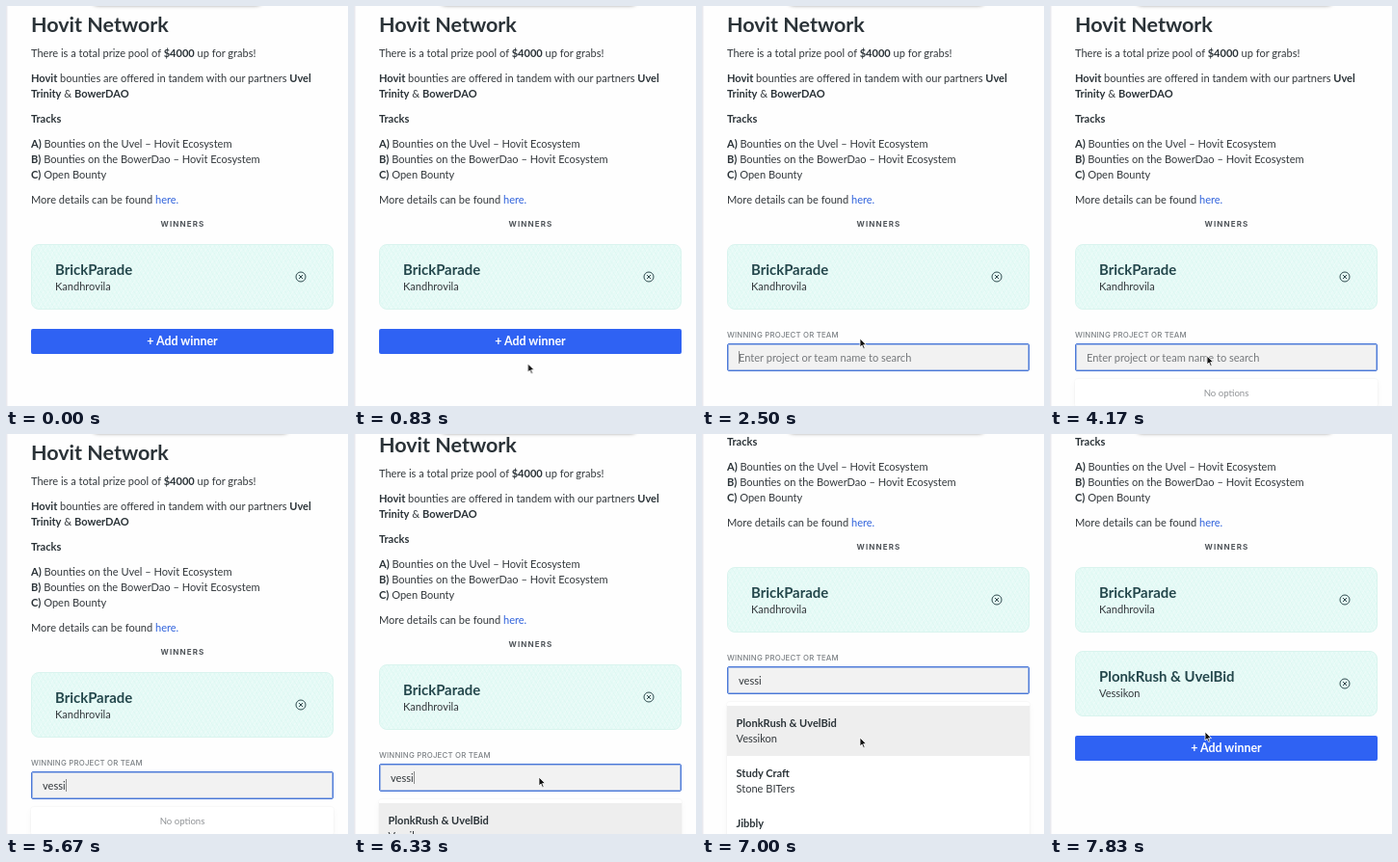
An HTML page for the animation above (8000 ms loop, 355 px wide and 415 px high).

```html
<!DOCTYPE html>
<html lang="en">
<head>
<meta charset="utf-8">
<title>Add a winner</title>
<style>
  html, body { margin: 0; width: 100%; height: 100%; overflow: hidden; background: #fff; }
  body { font: 11.05px/16px Lato, sans-serif; color: #33383c; }
  b, h1, h2 { font-weight: 700; color: #2b3338; }

  /* One loop is 48 frames; every keyframe falls on a multiple of 1/48. */
  .fx, .typed::before { animation: 8s step-end -5ms infinite; }

  .stage { position: relative; width: 355px; height: 415px; overflow: hidden; background: #fefefe; }
  .edge { position: absolute; left: 0; top: 0; width: 1px; height: 100%; background: #e9e9ee; border-right: 1px solid #f4f4f7; }
  .bar {
    position: absolute; left: 90px; top: -12px; width: 203px; height: 11px; border-radius: 6px;
    background: #fff; box-shadow: 0 0 4px rgba(0, 0, 0, .55); animation-name: bar;
  }
  .page { position: absolute; inset: 0; animation-name: scroll; }

  .line { position: absolute; left: 26px; top: calc(var(--y) * 1px - 8px); margin: 0; white-space: nowrap; }
  h1.line { font-size: 21.5px; }
  .link { color: #2f62dc; }
  .caps { font: 500 7.8px/16px Inter, sans-serif; letter-spacing: .2px; color: #7c8185; }
  .heading { left: 26px; width: 315px; text-align: center; font-weight: 700; font-size: 8px; letter-spacing: 1.1px; color: #4f5459; }

  .card {
    position: absolute; left: 26px; top: calc(var(--y) * 1px); width: 314px; height: 68px;
    box-sizing: border-box; border: 1px solid #d9f4ee; border-radius: 8px; background-color: #e5faf6;
    background-image:
      repeating-linear-gradient(60deg, rgba(200, 240, 231, .2) 0 1px, transparent 1px 4px),
      repeating-linear-gradient(-60deg, rgba(255, 255, 255, .25) 0 1px, transparent 1px 4px);
  }
  .card h2, .card p { position: absolute; left: 24px; margin: 0; white-space: nowrap; }
  .card h2 { top: 16px; font-size: 14.9px; line-height: 18px; color: #24474c; }
  .card p { top: 35px; }
  .card svg { position: absolute; left: 273px; top: 27px; fill: none; stroke: #2f4a4e; }

  .button {
    position: absolute; left: 26px; top: calc(var(--y) * 1px); width: 314px; height: 26px; border-radius: 2px;
    background: #2f62f3; color: #fff; font-weight: 700; font-size: 12.4px; line-height: 26px; text-align: center;
  }

  .input {
    position: absolute; left: 26px; top: 350px; width: 314px; height: 29px; box-sizing: border-box;
    display: flex; align-items: center; padding-left: 11px;
    border: 1px solid #4a78d8; border-radius: 2px; background: #f2f2f2;
    box-shadow: inset 0 0 0 1px rgba(74, 120, 216, .45);
  }
  .hint { position: absolute; left: 11px; color: #75787b; animation-name: hint; }
  .typed::before { content: ""; animation-name: type; }
  .caret { width: 1px; height: 13px; background: #8a8a8a; animation-name: caret; }

  .menu {
    position: absolute; left: 26px; top: 387px; width: 314px; background: #fff; border-radius: 3px;
    box-shadow: 0 0 0 1px rgba(0, 0, 0, .02), 0 3px 8px rgba(0, 0, 0, .035);
  }
  .none { height: 29px; line-height: 29px; font-size: 9.6px; text-align: center; color: #909396; animation-name: none-shown; }
  .results { padding: 4px 0; animation-name: results; }
  .option { height: 52px; padding: 10px 9.5px 0; box-sizing: border-box; }
  .option:first-child { background: #eeeeee; }
  .option b { display: block; }

  .start { animation-name: start; }
  .form { animation-name: form; }
  .done { animation-name: done; }

  .cursor { position: absolute; left: 0; top: 0; animation-name: travel; animation-timing-function: steps(4); }
  .cursor svg { position: absolute; overflow: visible; stroke-linejoin: round; }
  .arrow { left: 0; top: 0; fill: #111; stroke: #fff; stroke-width: .8px; animation-name: arrow; }
  .hand { left: -5px; top: -5px; fill: #fff; stroke: #222; stroke-width: .8px; animation-name: hand; }

  @keyframes bar { 0% { width: 175px; } 6.25%, 100% { width: 203px; } }
  @keyframes scroll {
    0% { transform: none; }
    79.1667% { transform: translateY(-8px); }
    81.25% { transform: translateY(-48px); }
    83.3333% { transform: translateY(-90px); }
    85.4167%, 100% { transform: translateY(-109px); }
  }
  @keyframes start { 0% { opacity: 1; } 31.25%, 100% { opacity: 0; } }
  @keyframes form { 0% { opacity: 0; } 31.25% { opacity: 1; } 93.75%, 100% { opacity: 0; } }
  @keyframes done { 0% { opacity: 0; } 93.75%, 100% { opacity: 1; } }
  @keyframes none-shown { 0% { opacity: 0; } 41.6667% { opacity: 1; } 77.0833%, 100% { opacity: 0; } }
  @keyframes results { 0% { opacity: 0; } 77.0833%, 100% { opacity: 1; } }
  @keyframes hint { 0% { opacity: 1; } 62.5%, 100% { opacity: 0; } }
  @keyframes type {
    0% { content: ""; }
    62.5% { content: "v"; }
    64.5833% { content: "ve"; }
    66.6667% { content: "ves"; }
    68.75% { content: "vess"; }
    70.8333%, 100% { content: "vessi"; }
  }
  @keyframes caret {
    0%, 31.25%, 43.75%, 56.25%, 89.5833% { opacity: 1; }
    37.5%, 50%, 83.3333%, 100% { opacity: 0; }
  }
  @keyframes travel {
    0%, 6.25% { transform: translate(188px, 392px); }
    14.5833%, 22.9167% { transform: translate(173px, 350px); }
    31.25% { transform: translate(164px, 345px); }
    39.5833%, 58.3333% { transform: translate(163px, 363px); }
    66.6667%, 79.1667% { transform: translate(192px, 356px); }
    87.5% { transform: translate(164px, 315px); }
    95.8333%, 100% { transform: translate(161px, 309px); }
  }
  @keyframes arrow {
    0%, 12.5%, 62.5% { opacity: 0; }
    6.25%, 31.25%, 77.0833%, 100% { opacity: 1; }
  }
  @keyframes hand { 0% { opacity: 0; } 12.5% { opacity: 1; } 31.25%, 100% { opacity: 0; } }
</style>
</head>
<body>
<main class="stage">
  <div class="edge"></div>

  <div class="page fx">
    <h1 class="line" style="--y:19">Hovit Network</h1>
    <p class="line" style="--y:49">There is a total prize pool of <b>$4000</b> up for grabs!</p>
    <p class="line" style="--y:75"><b>Hovit</b> bounties are offered in tandem with our partners <b>Uvel</b></p>
    <p class="line" style="--y:91"><b>Trinity</b> &amp; <b>BowerDAO</b></p>
    <p class="line" style="--y:117"><b>Tracks</b></p>
    <p class="line" style="--y:143"><b>A)</b> Bounties on the Uvel – Hovit Ecosystem</p>
    <p class="line" style="--y:159"><b>B)</b> Bounties on the BowerDao – Hovit Ecosystem</p>
    <p class="line" style="--y:175"><b>C)</b> Open Bounty</p>
    <p class="line" style="--y:201">More details can be found <span class="link">here.</span></p>
    <p class="line caps heading" style="--y:226">WINNERS</p>

    <section class="card" style="--y:247">
      <h2>BrickParade</h2>
      <p>Kandhrovila</p>
      <svg width="12" height="12"><circle cx="6" cy="6" r="5"/><path d="M4 4l4 4M8 4l-4 4"/></svg>
    </section>

    <div class="start fx">
      <div class="button" style="--y:335">+ Add winner</div>
    </div>

    <div class="form fx">
      <p class="line caps" style="--y:341">WINNING PROJECT OR TEAM</p>
      <div class="input">
        <span class="hint fx">Enter project or team name to search</span>
        <span class="typed"></span><i class="caret fx"></i>
      </div>
      <div class="menu none fx">No options</div>
      <div class="menu results fx">
        <div class="option"><b>PlonkRush &amp; UvelBid</b>Vessikon</div>
        <div class="option"><b>Study Craft</b>Stone BITers</div>
        <div class="option"><b>Jibbly</b></div>
      </div>
    </div>

    <div class="done fx">
      <section class="card" style="--y:334">
        <h2>PlonkRush &amp; UvelBid</h2>
        <p>Vessikon</p>
        <svg width="12" height="12"><circle cx="6" cy="6" r="5"/><path d="M4 4l4 4M8 4l-4 4"/></svg>
      </section>
      <div class="button" style="--y:422">+ Add winner</div>
    </div>
  </div>

  <div class="bar fx"></div>
  <div class="cursor fx">
    <svg class="arrow fx" width="8" height="12"><path d="M0 0V9L2.1 7.1 3.6 10.6 5.1 9.9 3.6 6.6H6.5Z"/></svg>
    <svg class="hand fx" width="11" height="13"><path d="M3 7V1.4Q3.8.2 4.7 1.4V4.6Q5.8 4 6.4 4.9 7.4 4.4 8 5.3 9.3 5 9.6 6.3V9L8.6 12H4L.8 8.2Q.6 6.6 2 7.2L3 8.2Z"/></svg>
  </div>
</main>
</body>
</html>
```
